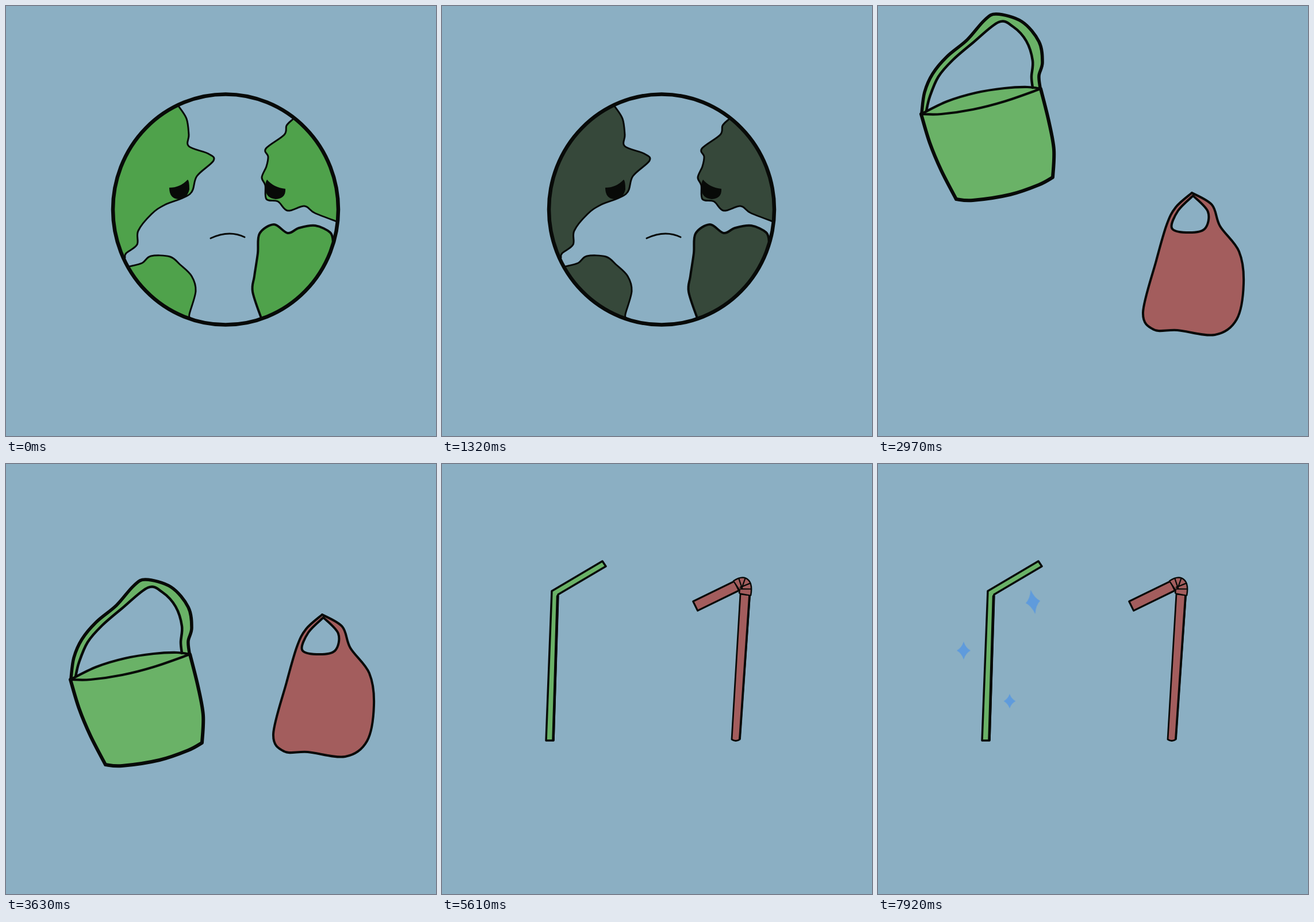
Recreate the animation shown at these times as an HTML page. Size 748x748 px, loop 8 s.

```html
<!DOCTYPE html>
<html lang="en">
<head>
<meta charset="utf-8">
<title>Sad planet, better choices</title>
<style>
  html, body { margin: 0; width: 100%; height: 100%; overflow: hidden; background: #8bafc3; }
  svg { display: block; width: 100vw; height: 100vh; }
  path, ellipse { stroke-linecap: round; stroke-linejoin: round; }
</style>
</head>
<body>
<svg id="stage" viewBox="0 0 748 748"></svg>
<script>
const LOOP = 8000;
const INK = '#080a08', GREEN = '#6ab267', RED = '#a35d5d';
const stage = document.getElementById('stage');

function add(parent, tag, attrs = {}) {
  const el = document.createElementNS('http://www.w3.org/2000/svg', tag);
  for (const key in attrs) el.setAttribute(key, attrs[key]);
  return parent.appendChild(el);
}
const group = (parent, attrs) => add(parent, 'g', attrs);
const fill = (parent, d, color) => add(parent, 'path', { d, fill: color, 'fill-rule': 'evenodd' });
const line = (parent, d, width, color = INK) =>
  add(parent, 'path', { d, fill: 'none', stroke: color, 'stroke-width': width });
const shape = (parent, d, color, width) => {
  fill(parent, d, color);
  return line(parent, d, width);
};

// Smooth path through points; "/" marks a corner.
function curve(text) {
  let d = '', last;
  for (const part of text.split('/')) {
    const pts = part.trim().split(/\s+/).map(p => p.split(',').map(Number));
    if (last) pts.unshift(last); else d = 'M' + pts[0];
    for (let i = 0; i < pts.length - 1; i++) {
      const a = pts[i], b = pts[i + 1], before = pts[i - 1] || a, after = pts[i + 2] || b;
      const c1 = a.map((v, k) => v + (b[k] - before[k]) / 6);
      const c2 = b.map((v, k) => v - (after[k] - a[k]) / 6);
      d += `C${c1} ${c2} ${b}`;
    }
    last = pts[pts.length - 1];
  }
  return d;
}

// Hold each [time, value] until the next one.
function hold(el, prop, steps) {
  const frames = steps.map(([t, v]) => ({ offset: t / LOOP, [prop]: v, easing: 'steps(1, end)' }));
  frames.push({ offset: 1, [prop]: steps[steps.length - 1][1] });
  el.animate(frames, { duration: LOOP, iterations: Infinity });
}
function show(el, ...spans) {
  const steps = spans[0][0] > 0 ? [[0, 0]] : [];
  for (const [from, to] of spans) {
    steps.push([from, 1]);
    if (to < LOOP) steps.push([to, 0]);
  }
  hold(el, 'opacity', steps);
}

// Planet
const planet = group(stage);
const disc = { cx: 382, cy: 354, rx: 196, ry: 200.5 };
add(add(planet, 'clipPath', { id: 'disc' }), 'ellipse', disc);
const land = group(planet, { 'clip-path': 'url(#disc)' });

// Push a point on the rim well outside the disc.
function outside(point) {
  const [x, y] = point.split(',').map(Number);
  return [disc.cx + (x - disc.cx) * 1.8, disc.cy + (y - disc.cy) * 1.8];
}
function coast(text, width) {
  const pts = text.split(' '), d = curve(text);
  add(land, 'path', { d: `${d}L${outside(pts[pts.length - 1])}L${outside(pts[0])}Z` });
  line(planet, d, width);
}
coast('300,174 314,196 318,224 318,244 352,257 361,269 332,296 320,327 276,346 253,362 230,391 228,415 209,430 207,438', 3);
coast('215,453 237,447 252,435 285,436 303,450 323,470 330,496 319,536 321,543', 3);
coast('499,197 488,208 484,224 452,248 456,262 453,279 445,298 451,312 453,336 473,340 490,356 519,348 537,360 576,375', 3);
coast('569,411 564,394 538,382 510,386 490,395 466,380 441,396 438,430 432,470 429,497 444,543', 4);
add(planet, 'ellipse', { ...disc, fill: 'none', stroke: INK, 'stroke-width': 6.5 });
fill(planet, 'M284 316Q303 316 316 302Q319 304 319 319Q315 336 300 336Q284 335 284 316Z', INK);
fill(planet, 'M454 302Q466 316 486 318Q487 335 469 336Q452 334 451 318Q451 306 454 302Z', INK);
line(planet, 'M356 404Q388 389 415 402', 3);
hold(land, 'fill', [[0, '#4fa24b'], [660, '#427543'], [1320, '#36483a']]);
show(planet, [0, 2310]);

// Bags
const bags = group(stage);
const tote = group(bags);
const outer = '113,373 118,337 132,305 157,275 192,246 222,212 243,201 287,214 317,249 323,285 317,308 319,329';
const inner = '306,329 304,310 306,282 295,248 272,223 247,215 202,251 167,281 142,310 127,345 121,370';
const body = '112,375 127,425 147,473 173,523 / 202,525 267,515 317,498 341,485 / 343,437 334,387 320,331';
const rimTop = '112,375 157,353 207,338 257,330 297,328 320,331';
const rimLow = '/ 257,353 202,367 147,375 112,375';
fill(tote, curve(outer + '/' + inner), GREEN);
fill(tote, curve(body + rimLow), GREEN);
fill(tote, curve(rimTop + rimLow), GREEN);
line(tote, curve(outer), 5.5);
line(tote, curve(inner), 4.5);
line(tote, curve(rimTop + rimLow), 4.2);
line(tote, curve(body), 6);

const sack = group(bags);
const sackEdge = curve('550,262 585,283 599,320 632,364 640,420 628,482 590,509 525,501 484,500 465,470 488,380 506,318 522,287 550,262');
const sackHole = curve('552,267 578,295 572,325 540,331 515,323 526,293 552,267');
shape(sack, sackEdge + sackHole, RED, 4);

const move = (el, steps) =>
  hold(el, 'transform', steps.map(([t, x, y]) => [t, `translate(${x}px, ${y}px)`]));
move(tote, [[0, -64, -452], [2640, -50, -319], [2970, -37, -187], [3300, -19, -83], [3630, 0, 0]]);
move(sack, [[0, -6, 272], [2640, -5, 167], [2970, -4, 63], [3300, 0, 0]]);
show(bags, [2310, 5610]);

// Hand lettering
const labels = group(stage, { role: 'img', 'aria-label': 'Tote, Plastic' });
const letters = [
  'M111 107Q130 99 155 95M134 102Q136 119 140 136',
  'M173 109C160 108 157 132 171 132C188 132 188 108 173 109',
  'M207 90Q207 112 211 130M195 106L223 101',
  'M229 119Q248 116 246 110Q240 104 232 110Q223 121 231 128Q241 134 254 129',
  'M467 94Q465 112 469 129M461 101C463 86 485 86 480 101Q476 110 468 112',
  'M497 89Q499 111 504 124',
  'M533 104C518 101 514 119 522 120Q531 120 533 105Q533 116 540 120',
  'M559 101C542 98 543 107 552 109C566 112 559 121 545 118',
  'M576 89Q576 108 581 119M567 105L592 100',
  'M606 104L608 118M606 94L606.5 95',
  'M640 100Q626 98 624 108Q627 119 644 116'
];
for (const d of letters) line(labels, d, 5.4);
show(labels, [4290, 5610]);

const marks = group(stage);
fill(marks, 'M267 102Q272 97 281 117Q302 87 339 62Q318 87 284 125Q277 129 274 122Z', '#4da548');
line(marks, 'M661 87Q673 110 688 130M689 86Q672 104 659 126', 5.5, '#a54646');
show(marks, [4950, 5610]);

// Straws
const straws = group(stage);
shape(straws, 'M191 221L279 169L285 178L202 227L194 481L181 481Z', GREEN, 3.5);
line(straws, 'M201 230L193.5 480', 4.5);
shape(straws, 'M519 226L504 479Q511 484 518 479L535.5 228Z', RED, 2.8);
line(straws, 'M535 229L518 478', 3.8);

// Bendy top: the tip turns by an angle, the folds follow the bend.
function bendy(angle, reach) {
  const pose = group(straws), rad = angle * Math.PI / 180;
  const tip = group(pose, { transform: `translate(527 205) rotate(${angle})` });
  shape(tip, `M${-reach} -9H-16V9H${-reach}Z`, RED, 3.2);

  const base = [527, 227], knee = [532, 199];
  const neck = [527 - 16 * Math.cos(rad), 205 - 16 * Math.sin(rad)];
  const bend = `M${base}Q${knee} ${neck}`;
  for (const [width, color] of [[23, INK], [18, RED]])
    line(pose, bend, width, color).style.strokeLinecap = 'butt';
  for (let t = 0; t <= 1; t += 0.2) {
    const at = k => (1 - t) ** 2 * base[k] + 2 * t * (1 - t) * knee[k] + t * t * neck[k];
    const slope = k => (1 - t) * (knee[k] - base[k]) + t * (neck[k] - knee[k]);
    const dir = Math.atan2(slope(0), -slope(1));
    const across = r => [at(0) + r * Math.cos(dir), at(1) + r * Math.sin(dir)];
    line(pose, `M${across(-9)}L${across(10)}`, 2.2);
  }
  return pose;
}
show(bendy(-26, 96), [5610, 5940], [6930, LOOP]);
show(bendy(0, 91), [5940, 6270], [6600, 6930]);
show(bendy(32, 87), [6270, 6600]);
show(straws, [5610, LOOP]);

// Four-pointed star with half width w, half height h
function sparkle(start, x, y, w, h, lean) {
  const tips = [[-lean, -h], [w, -lean / 2], [lean, h], [-w, lean / 2]];
  const d = tips.map((p, i) => {
    const q = tips[(i + 1) % 4];
    return `Q${p.map((v, k) => (v + q[k]) * 0.3)} ${q}`;
  });
  const star = fill(stage, `M${tips[0]}${d.join('')}Z`, '#5f9bdc');
  star.setAttribute('transform', `translate(${x} ${y})`);
  show(star, [start, LOOP]);
}
sparkle(7260, 269.5, 240, 12.5, 21, 4);
sparkle(7590, 149, 324.5, 12, 15.5, 0);
sparkle(7920, 229, 412.5, 10.5, 12.5, 0);
</script>
</body>
</html>
```
